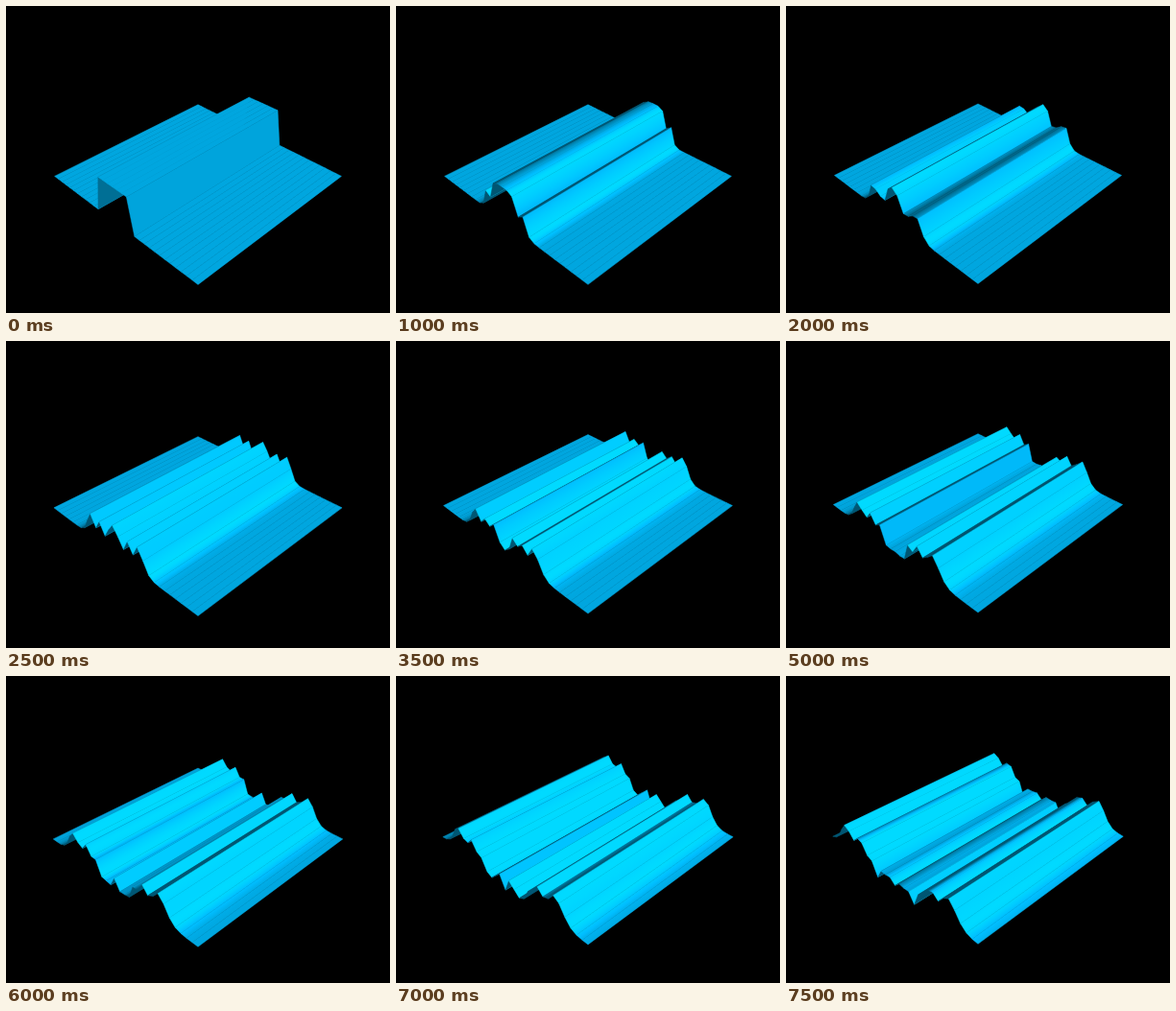
An HTML page with a canvas that plays this animation: 400x320 px, repeating every 8000 ms.

```html
<!DOCTYPE html>
<html lang="en">
<head>
<meta charset="utf-8">
<title>Wave sheet</title>
<style>
html, body { margin: 0; width: 100%; height: 100%; overflow: hidden; background: #000; }
canvas { display: block; }
</style>
</head>
<body>
<canvas id="stage" width="400" height="320"></canvas>
<script>
const ctx = document.getElementById('stage').getContext('2d');
const CELLS = 31, POSES = 16, HOLD = 500;
const SPEED = 0.65, SUBSTEPS = 20;      // cells per pose, solver steps per pose
const HEIGHT = 0.285;                   // pulse height; half the sheet's diagonal is 1
const DIST = 3.9, FOCAL = 595;
const SIN = 1 / Math.sqrt(3), COS = Math.sqrt(2 / 3);
const CELL = Math.SQRT2 / CELLS;
const CREASE = Math.PI / 3;             // sharper bends than this stay hard

// Wave equation on a string with fixed ends, released from a box-shaped pulse
function solve() {
  const k = (SPEED / SUBSTEPS) ** 2;
  const bend = (u, i) => i > 0 && i < CELLS ? u[i - 1] - 2 * u[i] + u[i + 1] : 0;
  let now = Array.from({ length: CELLS + 1 }, (_, i) => i >= 12 && i <= 18 ? 1 : 0);
  let before = now.map((h, i) => h + k / 2 * bend(now, i));
  const poses = [];
  for (let n = 0; n < POSES * SUBSTEPS; n++) {
    if (n % SUBSTEPS === 0) poses.push(now);
    const next = now.map((h, i) => 2 * h - before[i] + k * bend(now, i));
    before = now;
    now = next;
  }
  return poses;
}

function project(u, v, z) {
  const p = u + v - 1, q = u - v;
  const scale = FOCAL / (DIST - COS * q - SIN * z);
  return [200 + p * scale, 160 + (SIN * q - COS * z) * scale];
}

function shade(angle) {
  const light = Math.max(0.45, 1.16 * Math.cos(angle - 0.698) - 0.013);
  const level = c => Math.min(255, Math.round(c * light));
  return `rgb(0,${level(190)},${level(255)})`;
}

function strip(a, b, from, to) {
  const [a0, a1] = a, [b0, b1] = b;
  const dx = a1[0] - a0[0], dy = a1[1] - a0[1], len = Math.hypot(dx, dy);
  const nx = -dy / len, ny = dx / len;
  const mid = (p, q, j) => (p[j] + q[j]) / 2;
  const x = mid(a0, a1, 0), y = mid(a0, a1, 1);
  const w = (mid(b0, b1, 0) - x) * nx + (mid(b0, b1, 1) - y) * ny;
  let paint = shade((from + to) / 2);
  if (Math.abs(w) > 0.5 && Math.abs(from - to) > 0.001) {
    paint = ctx.createLinearGradient(x, y, x + nx * w, y + ny * w);
    for (let s = 0; s <= 1; s += 0.25) paint.addColorStop(s, shade(from + (to - from) * s));
  }
  ctx.fillStyle = ctx.strokeStyle = paint;
  ctx.beginPath();
  for (const [px, py] of [a0, a1, b1, b0]) ctx.lineTo(px, py);
  ctx.closePath();
  ctx.fill();
  ctx.stroke();
}

function draw(heights) {
  ctx.fillStyle = '#000';
  ctx.fillRect(0, 0, 400, 320);
  ctx.lineWidth = 0.5;
  ctx.lineJoin = 'round';

  // The camera always aims at the middle of the height range
  const centre = (Math.max(...heights) + Math.min(...heights)) / 2;
  const z = heights.map(h => (h - centre) * HEIGHT);
  const edges = z.map((h, i) => [project(i / CELLS, 0, h), project(i / CELLS, 1, h)]);
  const tilt = z.slice(1).map((h, i) => Math.atan2(z[i] - h, CELL));
  const blend = (i, j) => {
    const other = tilt[j];
    return other !== undefined && Math.abs(other - tilt[i]) < CREASE
      ? (tilt[i] + other) / 2 : tilt[i];
  };

  const eye = DIST * SIN;
  for (let i = 0; i < CELLS; i++) {
    const along = (i + 0.5) * CELL - Math.SQRT1_2;
    const facing = Math.sin(tilt[i]) * (eye - along)
                 + Math.cos(tilt[i]) * (eye - (z[i] + z[i + 1]) / 2);
    const flip = facing < 0 ? Math.PI : 0;
    strip(edges[i], edges[i + 1], blend(i, i - 1) + flip, blend(i, i + 1) + flip);
  }
}

const poses = solve();
let shown = -1;
function tick() {
  const pose = Math.floor(performance.now() / HOLD) % POSES;
  if (pose !== shown) draw(poses[shown = pose]);
  requestAnimationFrame(tick);
}
tick();
</script>
</body>
</html>
```
